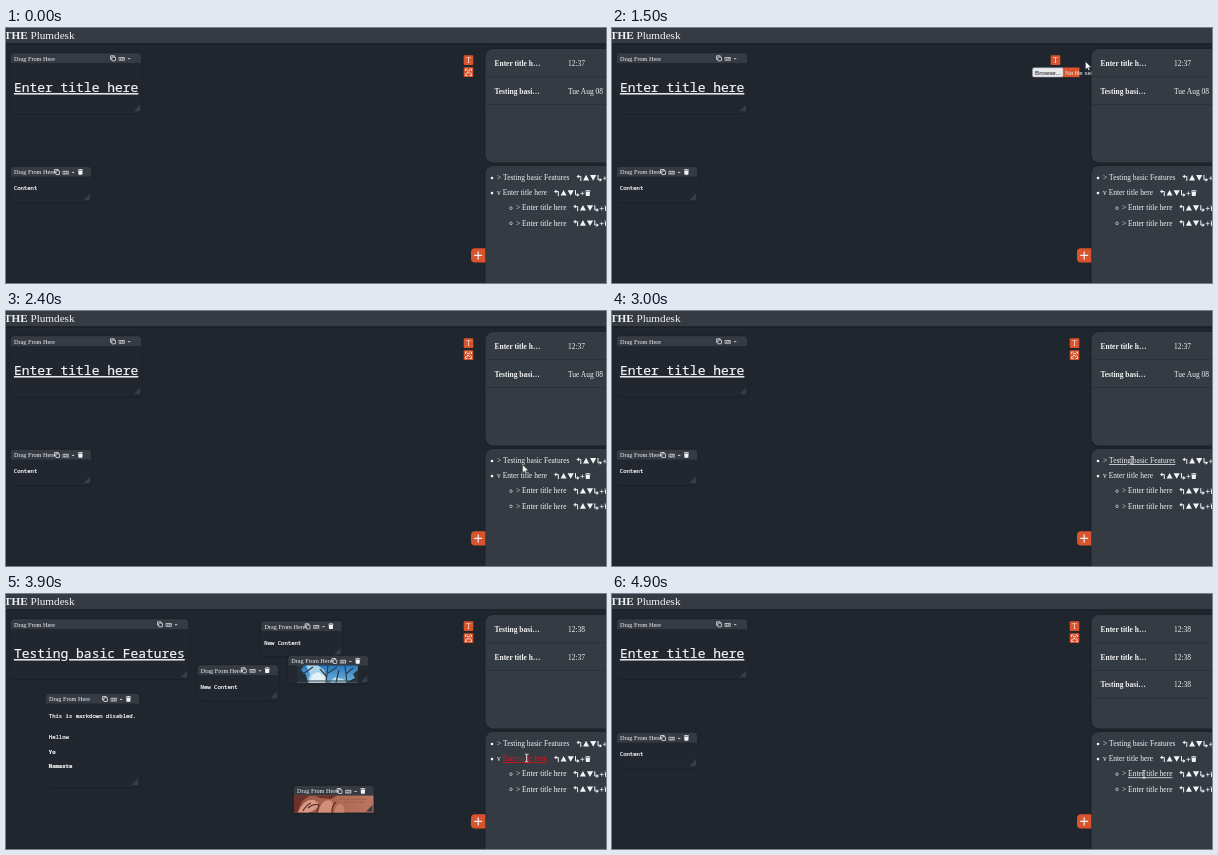
These frames come from a looping animation (600x255 px, 5 s). An HTML page:

```html
<!DOCTYPE html>
<html lang="en">
<head>
<meta charset="utf-8">
<title>Notes</title>
<style>
  html, body { margin: 0; width: 100%; height: 100%; overflow: hidden; background: #20262d; }
  svg { display: block; width: 600px; height: 255px; }
  text { fill: #f2f3f4; white-space: pre; }
  .serif { font-family: "Liberation Serif", "Times New Roman", serif; font-size: 7.47px; }
  .drag { font-size: 6.22px; }
  .brand { font-size: 11.2px; }
  .mono { font-family: "Noto Sans Mono", "DejaVu Sans Mono", monospace; font-size: 5.6px; stroke: #f2f3f4; stroke-width: .22px; }
  .title { font-size: 12.95px; }
  .sans { font-family: "Liberation Sans", Arial, sans-serif; font-size: 6.22px; }
  .bold { font-weight: 700; }
  .dark { fill: #111; }
  .under { text-decoration: underline; }
  .red { fill: #e50f14; }
  .panel { fill: #363b43; }
  .orange { fill: #d9532c; }
  .line { fill: none; stroke: #f2f3f4; }
  .fill { fill: #f2f3f4; }
</style>
</head>
<body>
<svg id="stage" viewBox="0 0 600 255">
  <defs>
    <filter id="soft" x="-10%" y="-20%" width="120%" height="140%">
      <feDropShadow dx="0" dy="0.3" stdDeviation="1.1" flood-color="#0c1014" flood-opacity=".4"/>
    </filter>
    <linearGradient id="sky" x2="0" y2="1">
      <stop offset="0" stop-color="#2878bd"/><stop offset="1" stop-color="#6fb4de"/>
    </linearGradient>
    <linearGradient id="skin">
      <stop offset="0" stop-color="#9c5140"/><stop offset=".6" stop-color="#b06a55"/><stop offset="1" stop-color="#b97660"/>
    </linearGradient>
    <g id="trash" class="fill">
      <path d="M-2.6-2.5H-1L-.6-3.1H.6L1-2.5H2.6V-1.7H-2.6ZM-2.2-1.2H2.2L1.9 2.8H-1.9Z"/>
    </g>
    <g id="copy" class="line" stroke-width=".75">
      <rect x="-1.2" y="-1.2" width="3.7" height="3.7" rx=".5"/>
      <path d="M-1.4 1H-2.4V-2.5H1.2V-1.4"/>
    </g>
    <g id="badge">
      <rect x="-3.1" y="-1.7" width="6.2" height="3.8" rx=".6" fill="#b9bdc2"/>
      <path d="M-2.1 1.2V-.7L-1.1.4-.1-.7V1.2M1.5-.8V1M.7.3 1.5 1.1 2.3.3" fill="none" stroke="#363b43" stroke-width=".6"/>
    </g>
    <g id="tools">
      <path class="line" stroke-width="1" d="M4.3 3V-1.6H1.5"/>
      <path class="fill" d="M0-1.6 2.4-3.6V.4Z"/>
      <path class="fill" d="M6.6 2.4 9.6-3.2 12.6 2.4ZM13.6-2.9H19.8L16.7 2.7Z"/>
      <path class="line" stroke-width="1" d="M21.5-3V1.8H23.5"/>
      <path class="fill" d="M25.6 1.8 23.2-.1V3.7Z"/>
      <path class="line" stroke-width=".7" d="M26.4.3H30.4M28.4-1.7V2.3"/>
      <use href="#trash" x="33.8"/>
    </g>
  </defs>
  <g id="page"></g>
  <g id="bar"></g>
  <g id="panels"></g>
  <g id="list"></g>
  <g id="tree"></g>
  <rect y="15" width="600" height="1.5" fill="#171c21"/>
  <rect class="panel" width="600" height="15.3"/>
  <text class="serif brand" x="-2" y="10.8"><tspan class="bold">THE</tspan> Plumdesk</text>
  <path id="arrow" d="M0 0V8L1.9 6.3 3.1 9 4.4 8.4 3.2 5.8H5.7Z" fill="#fff" stroke="#222" stroke-width=".4"/>
  <path id="beam" class="line" stroke-width=".9" d="M-1.7-3.8H-.5L0-3.3.5-3.8H1.7M0-3.3V3.3M-1.7 3.8H-.5L0 3.3.5 3.8H1.7"/>
</svg>
<script>
const LOOP = 5000;
const $ = id => document.getElementById(id);
const text = (x, y, s, cls) => `<text x="${x}" y="${y}" class="${cls}">${s}</text>`;
const use = (id, x, y) => `<use href="#${id}" x="${x}" y="${y}"/>`;
const rect = (x, y, w, h, rest) => `<rect x="${x}" y="${y}" width="${w}" height="${h}" ${rest}/>`;

function card(x, y, w, h, body, canDelete = true) {
  const r = x + w, b = y + h, mid = y + 5, shift = canDelete ? 0 : 6;
  return `<g filter="url(#soft)">${rect(x, y, w, h, 'rx="3" fill="#20262d" stroke="#2a3037" stroke-width=".6"')}</g>
    <path class="panel" d="M${x} ${y + 9.6}V${y + 3}q0-3 3-3H${r - 3}q3 0 3 3V${y + 9.6}Z"/>
    ${body}
    <path d="M${r - 1} ${b - 7.5}V${b - 1}H${r - 7.5}Z" fill="#383e46"/>
    ${text(x + 3, y + 7.2, "Drag From Here", "serif drag")}
    ${use("copy", r - 34 + shift, mid)}${use("badge", r - 25.3 + shift, mid + .4)}
    <path class="line" stroke-width=".8" d="M${r - 19.1 + shift} ${mid + .4}h2.4"/>
    ${canDelete ? use("trash", r - 10.6, mid) : ""}`;
}

const heading = (s, w) => card(5, 25.3, w, 59, text(8, 64.1, s, "mono title under"), false);
const note = (x, y, s) => card(x, y, 80, 34, text(x + 2.8, y + 23.3, s, "mono"));

const trees = `${rect(291, 71.5, 61, 17, 'fill="url(#sky)"')}
  <path d="M300 71.5H312L318 76 321 88.5H302L304 80Z" fill="#a9d3ea"/>
  <path d="M303 88.5 306 81 312 78 318 82 320 88.5Z" fill="#e6f1f6"/>
  <path d="M324 88.5 329 83 337 85 341 88.5Z" fill="#bcdcec"/>
  <path d="M291 71.5H298L295 76 300 81 302 88.5H291ZM352 76 347 80 349 84 340 88.5H352Z" fill="#26313a"/>
  <path d="M320 88.5 322 71.5M322 79 331 73M321 83 314 75M341 88.5 339 72M340 80 347 74M297 80 307 73M300 87H352M330 88.5 333 76" fill="none" stroke="#2d3b45" stroke-width="1.2"/>`;
const hands = `${rect(288, 201.5, 79.5, 17, 'fill="url(#skin)"')}
  <path d="M288 201.5H304L296 207 291 218.5H288ZM309 201.5H331L325 205 314 204Z" fill="#6b3229"/>
  <path d="M292 218.5Q298 204 308 206 315 209 311 214 306 218 302 218.5Z" fill="#d59a84"/>
  <path d="M312 218.5Q315 206 323 206 330 208 325 218.5Z" fill="#cf8f79"/>
  <path d="M328 218.5Q330 209 335 210 340 213 338 218.5Z" fill="#c5836c"/>
  <path d="M302 214Q308 209 313 211 311 218 311 218.5M326 218Q326 211 330 208M297 217Q300 211 305 209" fill="none" stroke="#692f26" stroke-width="1.3"/>
  <path d="M333 205.3H361M338 208H359" stroke="#8a4c3e" stroke-width=".6" stroke-dasharray="3 1"/>`;

const pages = {
  enter: heading("Enter title here", 130) + note(5, 139, "Content"),
  testing: heading("Testing basic Features", 177)
    + note(255.5, 27.3, "New Content") + note(191.8, 71.3, "New Content")
    + card(282.3, 62, 80, 27, trees) + card(288, 192, 79.5, 26.5, hands)
    + card(40, 100, 93, 92,
        ["This is markdown disabled.", "Hellow", "Yo", "Namaste"].map((s, i) =>
          text(42.8, [123.6, 145.4, 159.8, 174.4][i], s, i > 1 ? "mono bold" : "mono")).join(""))
};

const tile = (x, y, mark) => rect(x, y, 9.6, 9.8, 'rx="1" class="orange"') + mark;
const letter = x => tile(x, 27.2, text(x + 2.5, 34.7, "T", "serif"));
const bars = {
  idle: letter(457.7) + tile(457.7, 39.3,
    `<path class="line" stroke-width=".8" d="M459.5 43V41H461.5M463.5 41H465.5V43M465.5 45.5V47.5H463.5M461.5 47.5H459.5V45.5M460 46.5 462 44 463.5 45.5 465 44.5M461 42.7H464"/>`),
  browse: letter(438.7) + rect(449, 39.5, 18.5, 9.6, 'class="orange"')
    + rect(420.5, 39.7, 30.6, 9.4, 'rx="1.5" fill="#e9e9ed" stroke="#8f8f9d" stroke-width=".5"')
    + text(423, 46.7, "Browse...", "sans dark") + text(453.2, 46.7, "No file selected.", "sans")
};

const E = "Enter title h…", T = "Testing basi…";
const lists = {
  start: [[E, "12:37"], [T, "Tue Aug 08"]],
  second: [[T, "12:38"], [E, "12:37"]],
  third: [[E, "12:38"], [T, "12:38"]],
  last: [[E, "12:38"], [E, "12:38"], [T, "12:38"]]
};
const drawList = (name, hover) => lists[name].map(([label, when], i) => {
  const y = 37.7 + 27.8 * i, u = i === hover ? " under" : "";
  return text(488.5, y, label, "serif bold" + u) + text(562, y, when, "serif" + u)
    + rect(480, y + 10.6, 120, .8, 'fill="#292f36"');
}).join("");

const links = [
  [491, ">", 497.1, "Testing basic Features", 570.5],
  [491, "v", 496.7, "Enter title here", 548],
  [510, ">", 516.1, "Enter title here", 567.3],
  [510, ">", 516.1, "Enter title here", 567.3]
];
const drawTree = (hover, red) => links.map(([x, sign, lx, label, tx], i) => {
  const y = 152.2 + 15.1 * i;
  const cls = "serif" + (i === hover ? " under" + (red ? " red" : "") : "");
  const dot = i < 2 ? 'class="fill"' : 'class="line" stroke-width=".6"';
  return `<circle cx="${x - 5}" cy="${y - 2.2}" r="1.3" ${dot}/>`
    + text(x, y, sign, "serif") + text(lx, y, label, cls) + use("tools", tx, y - 2.2);
}).join("");

$("panels").innerHTML = `<g filter="url(#soft)">
    ${rect(479.5, 21, 140, 113.5, 'rx="8" class="panel"')}
    ${rect(479.5, 138, 140, 140, 'rx="8" class="panel"')}</g>
  <path class="orange" d="M479.3 220.2V234.6H469q-4 0-4-4V224.2q0-4 4-4Z"/>
  <path class="line" stroke-width="1.2" d="M468.2 227.4h8M472.2 223.4v8"/>`;

// Each track holds [start ms, value...]; a value stays until the next start.
const tracks = {
  page: [[0, "enter"], [3200, "testing"], [4000, "enter"]],
  bar: [[0, "idle"], [1400, "browse"], [1600, "idle"]],
  list: [[0, "start", -1], [1700, "start", 1], [1900, "start", -1], [3300, "second", -1], [4000, "third", -1], [4900, "last", -1]],
  tree: [[0, -1, 0], [2500, 0, 0], [3100, 0, 1], [3200, 0, 0], [3500, -1, 0], [3700, 1, 0],
    [3900, 1, 1], [4000, 1, 0], [4300, -1, 0], [4500, 2, 0], [4800, 2, 1], [4900, 2, 0]],
  cursor: [[0, "none", 0, 0], [700, "arrow", 407, 186], [900, "arrow", 375, 165], [1000, "arrow", 268, 106],
    [1100, "arrow", 206, 78], [1300, "arrow", 222, 87], [1400, "arrow", 462, 42], [1500, "arrow", 473.5, 33.5],
    [1600, "arrow", 505, 28], [1700, "arrow", 540, 62], [1900, "arrow", 545, 80], [2000, "arrow", 545, 97],
    [2100, "arrow", 541, 114], [2200, "arrow", 532, 129], [2300, "arrow", 522, 142], [2400, "arrow", 516.6, 153.8],
    [2500, "beam", 517, 152], [2700, "beam", 519, 150], [3000, "beam", 520, 149.3],
    [3400, "beam", 520, 152], [3500, "arrow", 520, 156], [3600, "arrow", 520, 158], [3700, "beam", 520.5, 162],
    [3800, "beam", 520.7, 164], [4200, "beam", 522, 167], [4300, "arrow", 524, 170], [4400, "arrow", 527, 173],
    [4500, "beam", 530, 178], [4600, "beam", 531.5, 179.6], [4700, "beam", 532, 180.3]]
};
const apply = {
  page: name => { $("page").innerHTML = pages[name]; },
  bar: name => { $("bar").innerHTML = bars[name]; },
  list: (name, hover) => { $("list").innerHTML = drawList(name, hover); },
  tree: (hover, red) => { $("tree").innerHTML = drawTree(hover, red); },
  cursor: (kind, x, y) => ["arrow", "beam"].forEach(id => {
    $(id).setAttribute("transform", `translate(${x} ${y})`);
    $(id).style.display = id === kind ? "" : "none";
  })
};

const shown = {};
const begin = performance.now();
function draw() {
  const t = Math.max(0, performance.now() - begin) % LOOP;
  for (const key in tracks) {
    const step = tracks[key].findLast(s => s[0] <= t);
    if (shown[key] !== step) {
      shown[key] = step;
      apply[key](...step.slice(1));
    }
  }
  requestAnimationFrame(draw);
}
draw();
</script>
</body>
</html>
```
